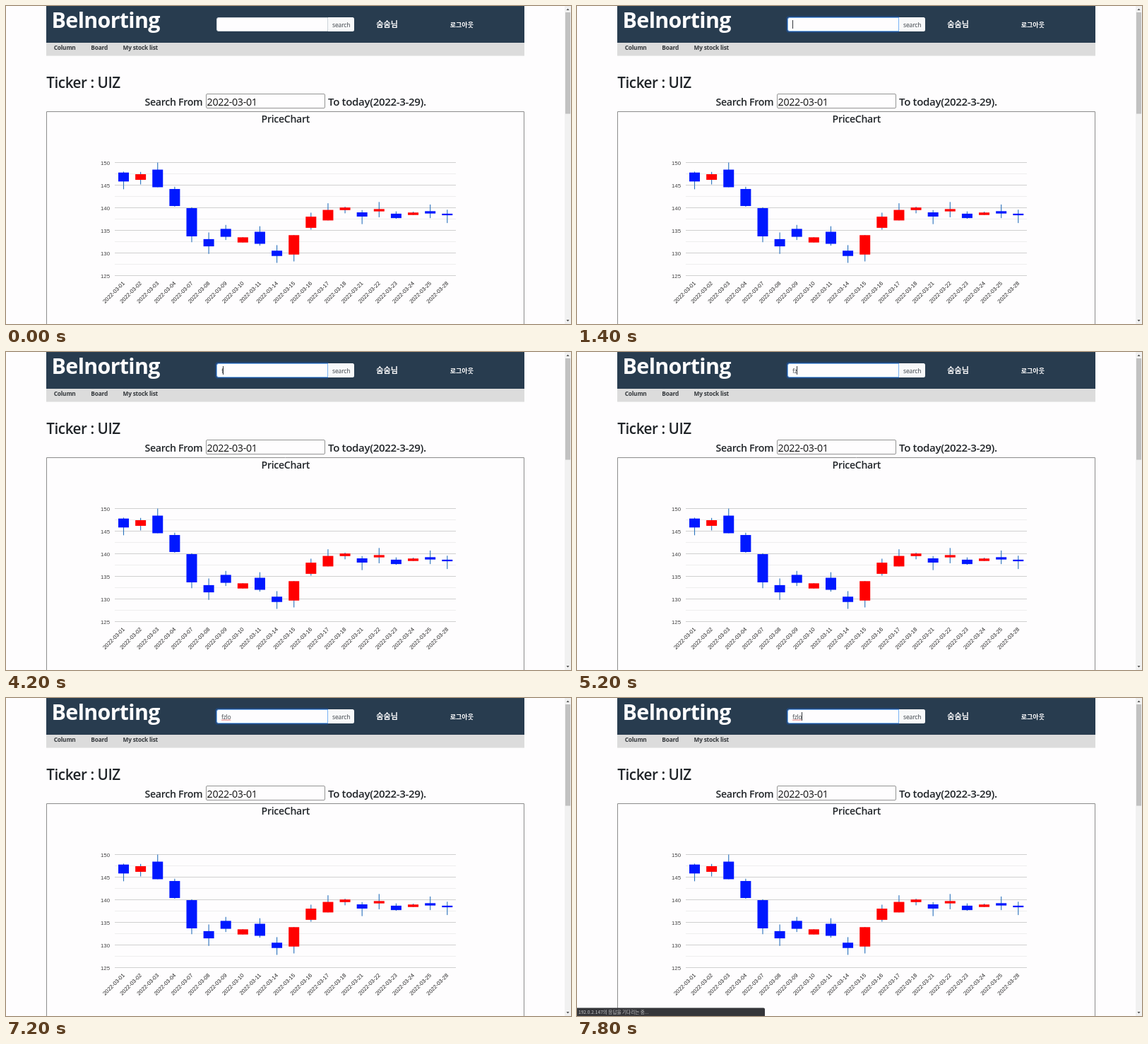
These frames come from a looping animation (800x450 px, 8000 ms). An HTML page with a canvas:

```html
<!DOCTYPE html>
<html lang="ko">
<head>
<meta charset="utf-8">
<title>Price chart</title>
<style>
html, body { margin: 0; width: 100%; height: 100%; overflow: hidden; background: #fefdfe; }
canvas { display: block; width: 800px; height: 450px; }
</style>
</head>
<body>
<canvas id="stage" width="800" height="450"></canvas>
<script>
const ctx = document.getElementById('stage').getContext('2d');

const LOOP = 8000, STEP = 200;
const SANS = '"Open Sans", "Noto Sans", sans-serif';
const ARIAL = '"Liberation Sans", sans-serif';
const KOREAN = '"Noto Sans CJK KR", "Noto Sans CJK", sans-serif';
const PAPER = '#fefdfe';
const INK = '#212529';

const QUERY = 'fzlo';
const FOCUS = 1210, KEYS = [4150, 4950, 5550, 5630];
const SPELLCHECK = 6800, STATUS = 7400;
const BLINK = 520;

// Centre line of the candles; + is a rising day
const PATH = [242, 242, 244, 271, 306, 335, 321, 331, 328, 350, 338, 306, 296, 287, 295, 289, 297, 294, 292, 295];
const MOVES = '-+-----+--++++-+-+--';
const WEEKDAYS = Array.from({ length: 28 }, (_, i) => i + 1).filter(d => d % 7 < 5);

function rect(x, y, w, h, color) {
  ctx.fillStyle = color;
  ctx.fillRect(x, y, w, h);
}

function box(x, y, w, h, radii, fill, stroke) {
  ctx.beginPath();
  ctx.roundRect(x, y, w, h, radii);
  if (fill) { ctx.fillStyle = fill; ctx.fill(); }
  if (stroke) { ctx.strokeStyle = stroke; ctx.lineWidth = 1; ctx.stroke(); }
}

// Draws a line of text and returns its width
function text(str, x, y, size, { weight = 400, color = INK, family = SANS, align = 'left' } = {}) {
  ctx.font = `${weight} ${size}px ${family}`;
  ctx.letterSpacing = family === SANS ? `${-0.022 * size}px` : '0px';
  ctx.textAlign = align;
  ctx.fillStyle = color;
  ctx.fillText(str, x, y);
  return ctx.measureText(str).width;
}

function triangle(x, y, dy) {
  ctx.fillStyle = '#505050';
  ctx.beginPath();
  ctx.moveTo(x - 2, y);
  ctx.lineTo(x + 2, y);
  ctx.lineTo(x, y + dy);
  ctx.fill();
}

// The caret restarts its blink on focus and on each key
function caretOn(t) {
  const last = [FOCUS, ...KEYS].filter(at => at <= t).pop();
  return last !== undefined && Math.floor((t - last) / BLINK) % 2 === 0;
}

function squiggle(from, to, y) {
  ctx.strokeStyle = '#e04a4a';
  ctx.lineWidth = 0.8;
  ctx.beginPath();
  for (let x = from; x <= to; x++) ctx.lineTo(x, y + (x - from) % 2);
  ctx.stroke();
}

function drawSearch(t) {
  const focused = t >= FOCUS;
  if (focused) box(296.2, 14.2, 161.6, 23.6, 4, 'rgba(13,110,253,0.25)');
  box(456, 16, 37, 20, [0, 2.5, 2.5, 0], '#f8f9fa');
  text('search', 462, 29.5, 8.6, { color: '#3c4248' });
  box(298.5, 16.5, 157, 19, [2.5, 0, 0, 2.5], PAPER, focused ? '#7ab3f5' : '#ced4da');

  const typed = QUERY.slice(0, KEYS.filter(at => at <= t).length);
  const end = 305 + text(typed, 305, 29.5, 8.6, { color: '#41464b' });
  if (t >= SPELLCHECK) squiggle(305, end, 30.7);
  if (caretOn(t)) rect(Math.floor(end), 20, 1, 12, '#33373b');
}

function drawHeader(t) {
  const white = { weight: 700, color: PAPER };
  const hangul = { ...white, family: KOREAN };
  const link = { weight: 700, color: '#33373b' };
  rect(57, 0, 677, 52, '#283c4f');
  text('Belnorting', 64.6, 30.7, 30.4, white);
  drawSearch(t);
  text('숨숨님', 524.3, 30.4, 11.1, hangul);
  text('로그아웃', 628.8, 29.5, 9, hangul);

  rect(57, 52, 677, 18.5, '#dcdcdc');
  text('Column', 67.7, 62, 8.3, link);
  text('Board', 120.3, 62, 8.3, link);
  text('My stock list', 165.5, 62, 8.3, link);
}

function drawTitles() {
  const semi = { weight: 600 };
  text('Ticker : UIZ', 57.3, 116.2, 20.7, semi);
  text('Search From', 196.4, 141, 14.2, semi);
  box(283.5, 124.5, 168, 20, 1.5, PAPER, '#949494');
  text('2022-03-01', 284.6, 141, 14.2, { color: '#111' });
  text('To today(2022-3-29).', 456, 141, 15.05, semi);
  box(57.5, 149.5, 676, 310, 0, null, '#8c8c8c');
  text('PriceChart', 361.6, 165, 14.1, semi);
}

// Bodies follow the local slope, calm down over the month and alternate long and short
function bodySize(i) {
  const prev = PATH[i - 1] ?? PATH[i], next = PATH[i + 1] ?? PATH[i];
  const base = 11 - i * 9 / 19 + 0.4 * Math.abs(next - prev);
  return base * (i % 2 ? 0.7 : 1.15);
}

const wave = (i, mean, swing, period) =>
  Math.max(0, mean + swing * Math.cos(2 * Math.PI * i / period));

function drawCandle(i) {
  const x = 166.5 + i * 24.12, size = bodySize(i), top = PATH[i] - size / 2;
  const above = wave(i - 2, 5, 5, 3.25), below = wave(i, 5, 6, 4.75);
  rect(x - 0.55, top - above, 1.1, above + size + below, '#2a72bd');
  rect(x - 7.5, top, 15, size, MOVES[i] === '+' ? '#ff0000' : '#0018ff');
  return x;
}

function drawChart() {
  const label = { family: ARIAL, color: '#444', align: 'right' };
  for (let i = 0; i <= 10; i++) {
    const major = i % 2 === 0, y = 221 + i * 16;
    rect(154, y, 483, 1, major ? '#d0d0d0' : '#eee');
    if (major) text(150 - i * 2.5, 147, y + 3.6, 7.8, label);
  }
  WEEKDAYS.forEach((day, i) => {
    const x = drawCandle(i);
    ctx.save();
    ctx.translate(x + 2, 393);
    ctx.rotate(-Math.PI / 4);
    text('2022-03-' + String(day).padStart(2, '0'), 0, 0, 7.8, { ...label, color: '#222' });
    ctx.restore();
  });
}

function drawScrollbar() {
  rect(791, 0, 9, 450, '#f1f1f1');
  rect(792, 9, 7, 143.5, '#c1c1c1');
  triangle(795.5, 6, -2.5);
  triangle(795.5, 444, 2.5);
}

function drawStatus() {
  box(-2, 438.5, 268, 14, [0, 2, 0, 0], '#35363a');
  text('192.0.2.147의 응답을 기다리는 중...', 2, 446.6, 6.6, { family: KOREAN, color: '#c8c9cb' });
}

function draw(t) {
  rect(0, 0, 800, 450, PAPER);
  drawHeader(t);
  drawTitles();
  drawChart();
  drawScrollbar();
  if (t >= STATUS) drawStatus();
}

const start = performance.now();
function tick() {
  const t = (performance.now() - start) % LOOP;
  draw(Math.floor(t / STEP) * STEP);
  requestAnimationFrame(tick);
}
tick();
</script>
</body>
</html>
```
